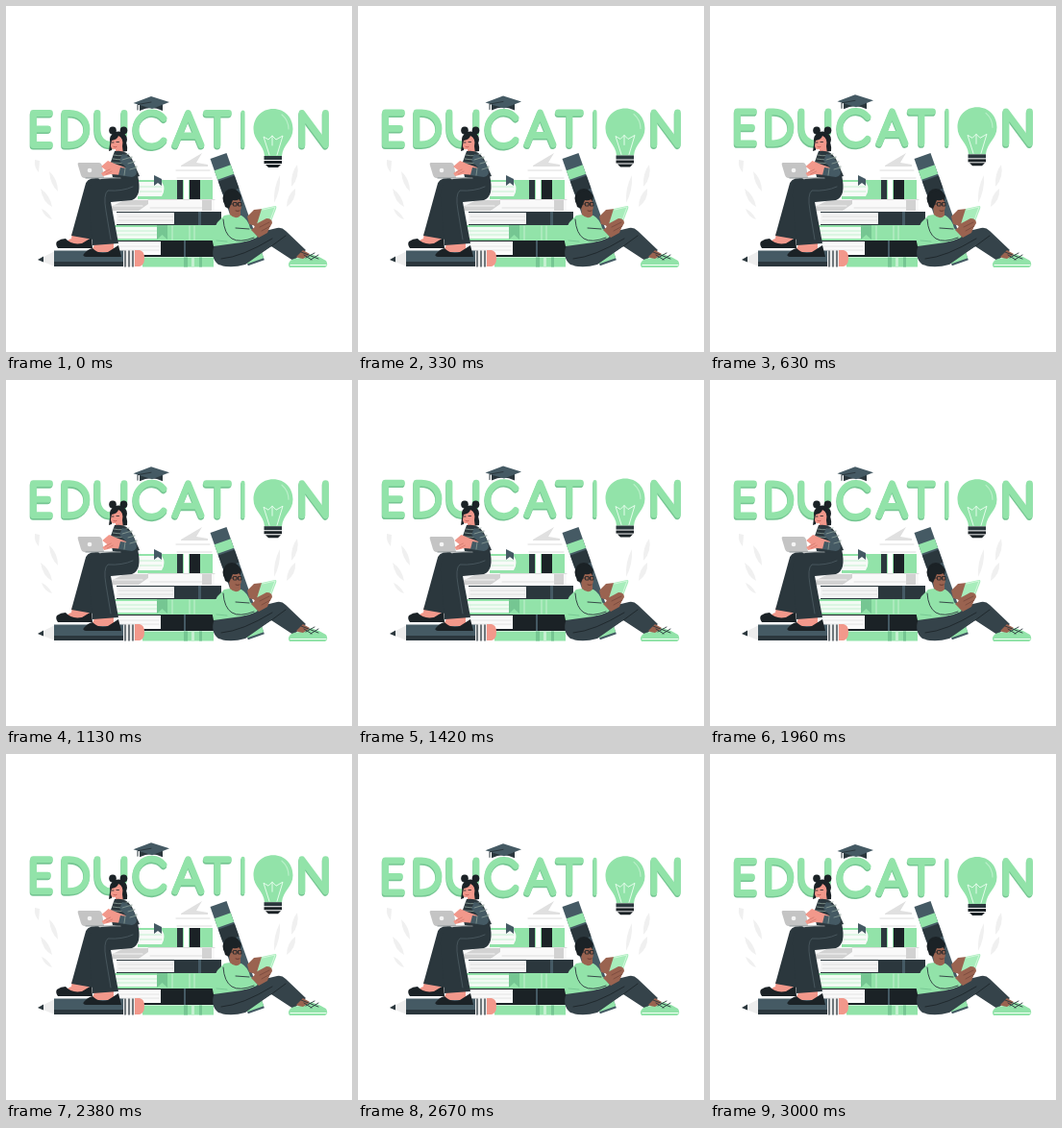
Write an HTML page with a canvas that moves like this. It is 360 px wide and 360 px high and loops after 3040 ms.

```html
<!DOCTYPE html>
<html lang="en">
<head>
<meta charset="utf-8">
<title>Education</title>
<style>
html, body { margin: 0; width: 100%; height: 100%; overflow: hidden; background: #fff; }
canvas { display: block; }
</style>
</head>
<body>
<canvas id="stage" width="360" height="360" role="img" aria-label="EDUCATION"></canvas>
<script>
const ctx = document.getElementById('stage').getContext('2d');
const LOOP = 3040, RISE = 4.5;
const GREEN = '#92e3a9', SHADE = '#75c692', PALE = '#c5f0d1';
const DARK = '#2b373d', SLATE = '#455a64', CLOTH = '#35434a', INK = '#1b2226';
const SKIN = '#f2988b', BROWN = '#9a6350', GREY = '#d2d2d2', FAINT = '#f0f0f0';

function fill(color, d) {
  ctx.fillStyle = color;
  ctx.fill(new Path2D(d));
}
function line(color, width, d) {
  ctx.strokeStyle = color;
  ctx.lineWidth = width;
  ctx.stroke(new Path2D(d));
}
function box(color, x, y, w, h) {
  ctx.fillStyle = color;
  ctx.fillRect(x, y, w, h);
}
function oval(color, x, y, rx, ry = rx) {
  ctx.fillStyle = color;
  ctx.beginPath();
  ctx.ellipse(x, y, rx, ry, 0, 0, Math.PI * 2);
  ctx.fill();
}
function shifted(dx, dy, draw) {
  ctx.save();
  ctx.translate(dx, dy);
  draw();
  ctx.restore();
}

const letters = [
  'M45.5 111.5H28.5V144.5H45.5M28.5 128H43.5',
  'M61 111.5H66C90 111.5 90 144.5 66 144.5H61Z',
  'M95 111.5V128C95 150 123 150 123 128V111.5',
  'M164 117A16.5 17.5 0 1 0 164 140',
  'M176 144.5L189.5 111.5L203 144.5M181 135H198',
  'M208.5 111.5H231.5M220 111.5V144.5',
  'M308 144.5V111.5L332.5 144.5V111.5'
];

function lettering() {
  const word = (color) => {
    letters.forEach(d => line(color, 6.8, d));
    line(color, 4, 'M246.5 110.5V146');
  };
  shifted(-0.4, 1.6, () => word(SHADE));
  word(GREEN);
}

function backdrop() {
  fill(FAINT, 'M30 160L35 161L34 173Q29 168 30 160ZM45 172Q54 180 54 193Q46 186 45 172ZM36 190Q46 197 48 209Q38 204 36 190ZM37 211Q44 214 48 222Q40 220 37 211Z');
  fill(FAINT, 'M285 176Q286 192 279 205Q278 189 285 176ZM303 165Q306 178 297 188Q296 174 303 165ZM301 190Q302 202 292 209Q292 197 301 190Z');
}

function cap() {
  fill(DARK, 'M139 99L139 109Q151 103 163 109L163 99Z');
  fill(SLATE, 'M132.5 101L151 94L170 100L152 107Z');
  line(DARK, 1, 'M151 100L137 102.5V108');
}

function bulb() {
  fill(GREEN, 'M278 107C266 107 257.5 116 257.5 128C257.5 140 268 144 269 156H287C288 144 298.5 140 298.5 128C298.5 116 290 107 278 107Z');
  line('#b9efc8', 1.2, 'M287 113Q294 119 294 128');
  line('#effff3', 0.9, 'M274 155L268 136L273 139L277 135L281 139L288 135L282 155M277 135V145');
  box(DARK, 268.5, 156, 18.5, 4);
  box(INK, 268.5, 161, 18.5, 3);
  fill(INK, 'M270 165H286L283 168H273Z');
}

// The word, its cap and the bulb float as one piece
function title() {
  cap();
  lettering();
  bulb();
}

function leaningBook() {
  ctx.save();
  ctx.translate(221, 156);
  ctx.rotate(-0.34);
  box(SLATE, -9, 0, 18, 118);
  box(GREEN, -9, 13, 18, 10);
  box(DARK, -9, 25, 18, 14);
  box(GREEN, -9, 104, 18, 12);
  ctx.restore();
}

function books() {
  fill('#e0e0e0', 'M182 166L204 153L198 163L210 165V167H182Z');
  line('#dcdcdc', 1, 'M177 171H212M178 179H214');

  box(GREEN, 137, 181, 78, 20);
  fill('#f8faf8', 'M137 183H162Q167 190 162 198H137Z');
  line(PALE, 1, 'M139 188H162M139 193H162');
  box(DARK, 178, 181, 6, 20);
  box('#fff', 185, 181, 5, 20);
  box(INK, 191, 181, 11, 20);
  fill(SLATE, 'M154 176L162 180V187L158 184L154 187Z');

  box('#f9f9f9', 106, 201, 111, 13);
  fill(GREY, 'M107 210L123 202H148V206L138 213H107Z');
  line('#f4f4f4', 1, 'M112 208H142');
  line('#dedede', 1, 'M148 201.5H217M150 210H204');
  box(GREY, 204, 202, 10, 11);

  box(DARK, 115, 214, 109, 14);
  box('#f4f4f4', 115, 215, 60, 12);
  line('#dedede', 1, 'M117 219H174M117 223H174');
  box(SLATE, 200, 214, 3, 14);

  box(GREEN, 113, 228, 105, 16);
  box('#f2fbf4', 113, 230, 44, 12);
  line(PALE, 1, 'M114 234H157M114 238H157');
  fill(SHADE, 'M157 228H168V243L162.5 238L157 243Z');
  line(PALE, 1, 'M173 229V243M191 229V243M196 229V243');

  box(INK, 113, 244, 105, 17);
  box('#fafafa', 113, 245, 48, 14);
  line('#e4e4e4', 1, 'M114 250H160M114 254H160');
  box(SLATE, 185, 244, 2, 17);

  box(GREEN, 142, 261.5, 74, 10);
  box(SHADE, 185, 261.5, 4, 10);
  box(PALE, 193, 261.5, 3, 10);
  box(SHADE, 201, 261.5, 3, 10);
}

function pencil() {
  fill('#ededed', 'M33 264L51 255V271Z');
  fill(DARK, 'M33 264L39 260.5V266.5Z');
  box(SLATE, 50, 254.5, 73, 16.5);
  box(DARK, 50, 266, 73, 5);
  box('#ededed', 122, 254.5, 12, 16.5);
  line(DARK, 1.3, 'M124 255V271M128 255V271M132 255V271');
  fill(SKIN, 'M134 254H139Q144 255 144 262Q144 270 139 271H134Z');
}

function woman(reach) {
  // Feet and legs
  fill(SKIN, 'M69 235H87L86 248H61Q64 243 68 242Z');
  fill(INK, 'M53 245Q57 242 62 242Q68 249 79 247L89 241L90 252H54Q51 248 53 245Z');
  fill(DARK, 'M96 179Q83 178 82 188L68 239L91 243L108 190Z');
  fill(SKIN, 'M92 242H112L112 256H88Q91 251 92 248Z');
  fill(INK, 'M81 258Q85 253 90 252Q97 259 106 256L117 249L120 261H83Q79 260 81 258Z');
  fill(DARK, 'M137 176Q142 198 131 202L109 204L117 247L90 249L86 199Q85 183 99 180Z');
  line('#53636a', 0.7, 'M132 188Q121 193 106 192Q101 196 104 213L109 243');

  // Head
  oval(INK, 111, 129.5, 3.8, 4);
  oval(INK, 122.5, 129.5, 3.8, 4);
  oval(INK, 117, 139, 9, 8.5);
  fill(INK, 'M109 137L107 151L110 150L112 140ZM122 138Q127 142 126 151L120 152Z');
  fill(SKIN, 'M110 140Q116 139 117 135Q123 138 121 146L122 154L114 154V149Q109 150 109 145Z');
  line(INK, 0.8, 'M110.5 142H112M115 141.5H117.5');
  line('#b84f4a', 0.8, 'M112 146.5Q113.5 147.5 115 146.5');

  // Striped top
  fill(DARK, 'M113 151Q125 149 131 159L139 177Q126 181 111 178L108 165Z');
  line('#8da099', 0.8, 'M112 155Q122 157 128 154M111 159Q122 161 131 158M110 163Q122 165 133 162M119 169Q128 170 136 167');

  // Laptop
  fill('#c4c4c4', 'M76 163H97Q99 163 100 166L102 179H81Q79 179 78 176L75 166Q74 163 76 163Z');
  oval('#f5f5f5', 87, 171, 2.3);
  line('#8c9496', 1.2, 'M83 179H119');

  shifted(reach, 0, () => {
    fill(SKIN, 'M99 167L106 161L113 164L124 168L121 176L109 175L101 177L99 174L104 171Z');
    line('#cf7569', 0.7, 'M102 173L108 170M104 175L110 172');
  });
  fill(SLATE, 'M121 154Q130 155 135 169Q138 177 131 178L117 176L119 168L126 169L118 161Z');
  line('#8da099', 0.8, 'M121 160L131 157M127 164L134 162M129 170L136 168M123 176L124 169');
}

function man() {
  // Trousers
  fill(CLOTH, 'M257 237L282 231Q287 230 291 234L312 254L299 265L276 250L249 269Q235 273 224 270Z');
  fill(CLOTH, 'M218 246L245 245L279 233Q287 232 292 239L276 250L248 268Q231 273 221 269Q211 261 218 246Z');
  line(INK, 0.8, 'M224 263Q246 261 277 242M276 250L291 239');

  // Shoe
  fill(BROWN, 'M302 261L309 254L316 258L310 265Z');
  fill(GREEN, 'M297 264Q303 261 309 263L317 258Q325 260 333 265Q336 270 332 272H295Q292 268 297 264Z');
  line('#f1fff4', 1.1, 'M296 269.5H333');
  line(DARK, 0.9, 'M307 256L325 263M312 262L321 257M317 264L325 259M310 259L318 264');

  // Sweater
  fill(GREEN, 'M227 218Q235 216 245 218Q252 222 254 231L261 241L245 246L216 250Q212 238 220 225Z');
  line(SHADE, 0.9, 'M219 244L230 245');

  // Head
  fill(BROWN, 'M232 207H244V218Q239 223 233 217Z');
  oval(INK, 235, 200, 9.5, 10);
  oval(BROWN, 238.5, 208, 6.5, 8.5);
  fill(INK, 'M228 209Q224 198 232 193Q240 190 245 198Q243 203 236 202L232 211Z');
  line(INK, 0.8, 'M233 206H236M237 204.5H240V208H237ZM242 204.5H245V208H242ZM240 206H242');
  line('#5b3229', 0.8, 'M239 213Q241 214 243 213');

  // Arms and tablet
  fill(GREEN, 'M227 222Q236 222 239 231L255 232L262 240Q249 248 236 244Q226 238 227 222Z');
  line(DARK, 0.9, 'M226 222Q227 237 235 242Q243 247 258 241M239 231L253 232');
  fill(BROWN, 'M251 219L258 212L267 211L276 226L272 236L263 241L255 233L260 229L253 227Z');
  fill('#a7edbb', 'M266 211L280 208Q282 208 281 211L276 224L261 227Z');
  line('#d7f8df', 0.9, 'M267 212L280 209L275 223');
  fill(BROWN, 'M258 228L271 221Q277 221 277 226L271 235L262 239Z');
  line('#71443a', 0.7, 'M264 230L274 225M266 234L275 229');
}

function draw(now) {
  const swing = (1 - Math.cos(now % LOOP / LOOP * Math.PI * 2)) / 2;
  ctx.lineCap = ctx.lineJoin = 'round';
  box('#fff', 0, 0, 360, 360);
  backdrop();
  shifted(0, -RISE * swing, title);
  leaningBook();
  books();
  pencil();
  woman(1.5 * swing);
  man();
}

let start;
function frame(now) {
  start ??= now;
  draw(now - start);
  requestAnimationFrame(frame);
}
draw(0);
requestAnimationFrame(frame);
</script>
</body>
</html>
```
